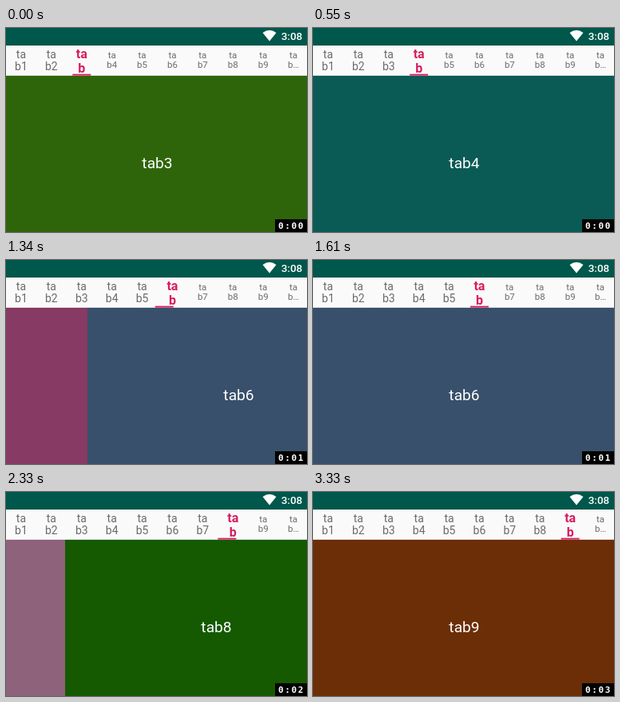
An HTML page for the animation above (3.71 s loop, 377 by 256 pixels).

```html
<!DOCTYPE html>
<html lang="en">
<head>
<meta charset="utf-8">
<title>Tab pager</title>
<style>
  html, body { margin: 0; width: 100%; height: 100%; overflow: hidden; }
  svg { display: block; width: 377px; height: 256px; font-family: Roboto, sans-serif; }
</style>
</head>
<body>
<svg id="stage" viewBox="0 0 377 256"></svg>
<script>
// The pager is slightly wider than the visible stage.
const W = 379, COUNT = 10, TAB = W / COUNT;
const LOOP = 3710, BEAT = 133.2, LAST_BEAT = 25;
const STRIP_TOP = 22.1, STRIP_END = 59.6;
const PINK = '#d81b60', GRAY = '#6b6b6b';
const FIRST = 2;
const pageColors = ['#2f650a', '#0a5a56', '#863a64', '#38506b', '#8e627a', '#155a00', '#6c2e06'];
const stage = document.getElementById('stage');

// Each swipe moves one page; times are in beats.
const swipes = [
  { start: 0, mid: 2.7, end: 4 },
  { start: 4, mid: 4.6, end: 6 },
  { start: 8.6, mid: 9.541, end: 12 },
  { start: 12, mid: 13, end: 15.6 },
  { start: 15, mid: 16.08, end: 19.5 },
  { start: 18, mid: 20.023, end: 25 }
];

// Speeds up under the finger until mid, then settles.
function progress({ start, mid, end }, beat) {
  if (beat <= start) return 0;
  if (beat >= end) return 1;
  return beat < mid
    ? 0.5 * ((beat - start) / (mid - start)) ** 3
    : 1 - 0.5 * ((end - beat) / (end - mid)) ** 3;
}

const rect = (x, y, w, h, fill) =>
  `<rect x="${x}" y="${y}" width="${w}" height="${h}" fill="${fill}"/>`;

const text = (str, x, y, size, fill, weight = 400, extra = 'text-anchor="middle"') =>
  `<text x="${x}" y="${y}" font-size="${size}" fill="${fill}" font-weight="${weight}" ${extra}>${str}</text>`;

function page(i, pos) {
  const x = Math.round((i - pos) * W);
  return rect(x, STRIP_END, W, 200, pageColors[i - FIRST]) +
    text('tab' + (i + 1), x + W / 2, 176, 19.2, '#fff');
}

function tab(i, selected) {
  const x = (i + 0.5) * TAB;
  const lines = (second, y1, y2, size, fill, weight) =>
    text('ta', x, y1, size, fill, weight) + text(second, x, y2, size, fill, weight);
  if (i === selected) return lines('b', 38, 56, 16, PINK, 700);
  const second = i === COUNT - 1 ? 'b…' : 'b' + (i + 1);
  return i < selected
    ? lines(second, 38, 53, 14, GRAY)
    : lines(second, 38, 50, 11.5, GRAY);
}

function draw(beat) {
  const pos = swipes.reduce((sum, s) => sum + progress(s, beat), FIRST);
  const selected = Math.floor(pos + 0.6);

  let out = page(Math.floor(pos), pos);
  if (pos % 1) out += page(Math.ceil(pos), pos);

  out += rect(0, 0, W, STRIP_TOP, '#00574b');
  out += rect(0, STRIP_TOP, W, STRIP_END - STRIP_TOP, '#fafafa');
  out += '<path d="M330 16.5L321.5 6Q330 -0.5 338.5 6Z" fill="#fff"/>';
  out += text('3:08', 358, 15, 13.5, '#fff', 500);

  for (let i = 0; i < COUNT; i++) out += tab(i, selected);
  out += rect((pos + 0.5) * TAB - 11.5, STRIP_END - 1.9, 23, 1.9, PINK);

  out += rect(337, 240, 40, 16, '#000');
  out += text('0:0' + Math.floor(beat / 7), 341, 251.5, 11, '#fff', 700,
    'font-family="DejaVu Sans Mono, monospace" letter-spacing="1.6"');
  stage.innerHTML = out;
}

let shown = -1;
function tick() {
  const beat = Math.min(LAST_BEAT, Math.floor(performance.now() % LOOP / BEAT));
  if (beat !== shown) draw(shown = beat);
  requestAnimationFrame(tick);
}
tick();
</script>
</body>
</html>
```
